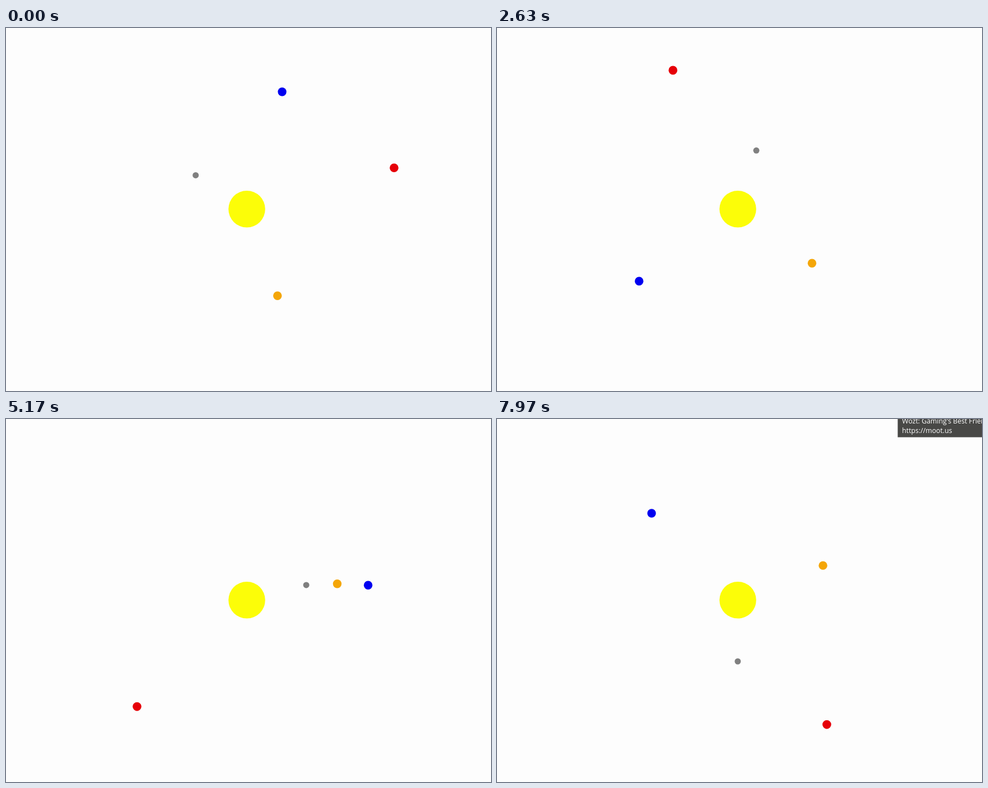
Animation, 866 px wide and 647 px high, one loop 8000 ms. Source, as an HTML page:

```html
<!DOCTYPE html>
<html lang="en">
<head>
<meta charset="utf-8">
<title>Orbits</title>
<style>
  html, body { margin: 0; width: 100%; height: 100%; overflow: hidden; background: #fdfdfd; }
  svg { display: block; width: 866px; height: 647px; }
  text { font: 12.3px "Open Sans", "Noto Sans", sans-serif; fill: #fff; }
</style>
</head>
<body>
<svg viewBox="0 0 866 647">
  <circle cx="430" cy="322.7" r="32.8" fill="#fcfd08"/>
  <g id="planets"></g>
  <g id="tooltip" visibility="hidden">
    <rect x="715.5" y="-20" width="160" height="52.5" fill="#484846"/>
    <text x="723.3" y="7.5">Wozt: Gaming's Best Friend</text>
    <text x="723.3" y="24.5">https://moot.us</text>
  </g>
</svg>
<script>
  const LOOP = 8000, TOOLTIP_AT = 7100;
  const CENTER = { x: 430, y: 322.6 };

  // start angle in degrees; speed relative to the outermost planet
  const planets = [
    { color: '#808080', size: 5.5, orbit: 109.4, start: 213.4, speed: 5 / 3 },
    { color: '#f4a608', size: 7.7, orbit: 164, start: 70.5, speed: 5 / 4 },
    { color: '#0000f0', size: 7.7, orbit: 218.2, start: -73.2, speed: 5 / 6 },
    { color: '#e60008', size: 7.8, orbit: 273, start: -15.6, speed: 1 }
  ];

  // [step, rotation]: the pace wavers slightly along the way
  const pace = [[0, 0], [22, 73.6], [79, 260.5], [124, 408.4], [155, 511.5], [188, 620], [239, 790]];

  const group = document.getElementById('planets');
  const tooltip = document.getElementById('tooltip');
  for (const p of planets) {
    p.node = document.createElementNS('http://www.w3.org/2000/svg', 'circle');
    p.node.setAttribute('r', p.size);
    p.node.setAttribute('fill', p.color);
    group.append(p.node);
  }

  function rotationAt(step) {
    const i = pace.findIndex(([s]) => s >= step) || 1;
    const [s0, r0] = pace[i - 1], [s1, r1] = pace[i];
    return r0 + (r1 - r0) * (step - s0) / (s1 - s0);
  }

  // 30 steps per second, each starting on a whole hundredth
  const stepAt = ms => Math.floor((Math.floor(ms / 10) + 0.5) * 0.3);

  function draw(ms) {
    const rotation = rotationAt(stepAt(ms));
    for (const p of planets) {
      const angle = (p.start + rotation * p.speed) * Math.PI / 180;
      p.node.setAttribute('cx', CENTER.x + p.orbit * Math.cos(angle));
      p.node.setAttribute('cy', CENTER.y + p.orbit * Math.sin(angle));
    }
    tooltip.setAttribute('visibility', ms >= TOOLTIP_AT ? 'visible' : 'hidden');
  }

  const begin = performance.now();
  function tick() {
    draw((performance.now() - begin) % LOOP);
    requestAnimationFrame(tick);
  }
  tick();
</script>
</body>
</html>
```
